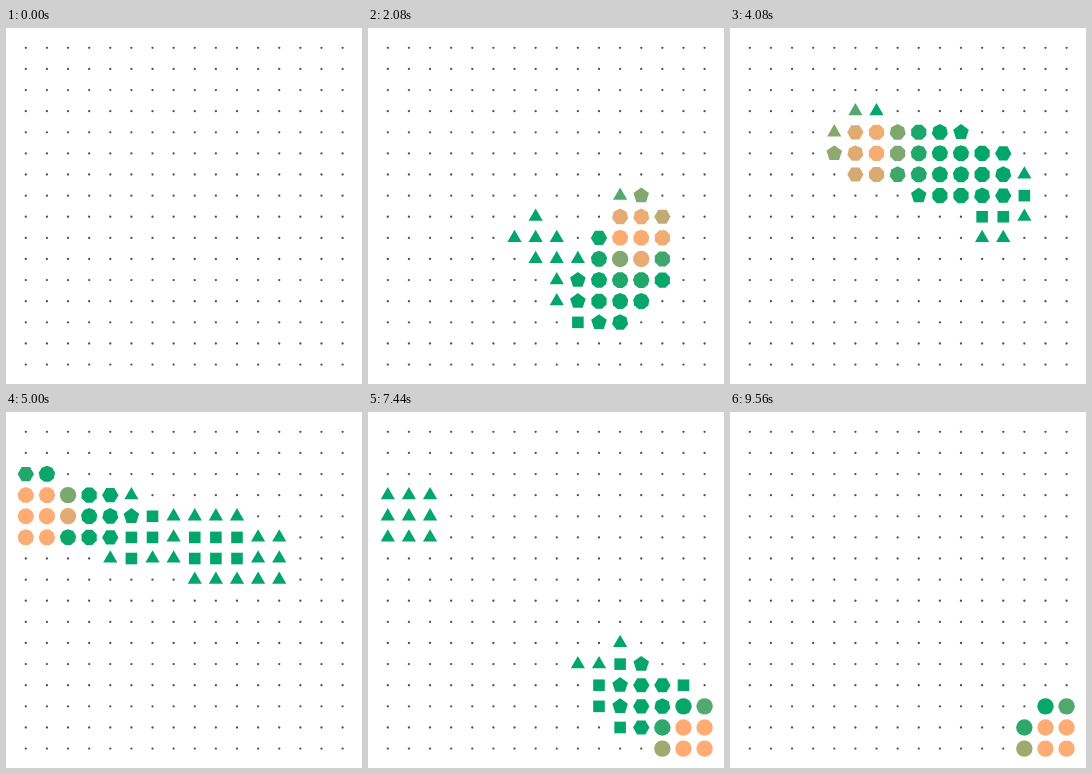
Animation of 356x356 px, one loop 9600 ms. Source, as an HTML page with a canvas:

```html
<!DOCTYPE html>
<html lang="en">
<head>
<meta charset="utf-8">
<title>Polygon trail</title>
<style>
  html, body { margin: 0; width: 100%; height: 100%; overflow: hidden; background: #fff; }
  canvas { display: block; width: 356px; height: 356px; }
</style>
</head>
<body>
<canvas id="stage"></canvas>
<script>
const SIZE = 356, LOOP = 9600, STEP = 40;
const COUNT = 16, START = 19.8, GAP = 21.12;
const REACH = 38, CORE = 33, RIM = 36.9;
const RISE = 0.17, FALL = 0.05, TINT = 0.5;
const RADIUS = 8.2, DOT = 1.15, MAX_SIDES = 11;
const GREEN = [3, 166, 106], ORANGE = [255, 172, 116];

// The pointer glides between these stops, easing in and out of each
const STOPS = [
  { at: 380, x: 140, y: 192 },
  { at: 920, x: 235, y: 272 },
  { at: 1700, x: 260, y: 257 },
  { at: 2250, x: 272, y: 180 },
  { at: 2800, x: 267, y: 157 },
  { at: 3160, x: 207, y: 127 },
  { at: 3500, x: 250, y: 150 },
  { at: 4400, x: 80, y: 104 },
  { at: 5000, x: 29, y: 97 },
  { at: 5750, x: 41, y: 107 },
  { at: 6400, x: 260, y: 276 },
  { at: 7250, x: 328, y: 329 }
];

const clamp = v => Math.max(0, Math.min(1, v));
const mix = (a, b, k) => a + (b - a) * k;
const smooth = k => k * k * (3 - 2 * k);

function pointerAt(time) {
  if (time < STOPS[0].at) return null;
  const next = STOPS.findIndex(stop => stop.at > time);
  if (next < 0) return STOPS[STOPS.length - 1];
  const a = STOPS[next - 1], b = STOPS[next];
  const k = smooth((time - a.at) / (b.at - a.at));
  return { x: mix(a.x, b.x, k), y: mix(a.y, b.y, k) };
}

function advance({ x, y, energy, heat }, pointer) {
  const distance = pointer ? Math.hypot(x - pointer.x, y - pointer.y) : Infinity;
  const inside = distance < REACH;
  return {
    x, y,
    energy: mix(energy, inside ? 1 : 0, inside ? RISE : FALL),
    heat: mix(heat, clamp((RIM - distance) / (RIM - CORE)), TINT)
  };
}

function simulate() {
  let cells = Array.from({ length: COUNT * COUNT }, (_, i) => ({
    x: START + (i % COUNT) * GAP,
    y: START + Math.floor(i / COUNT) * GAP,
    energy: 0,
    heat: 0
  }));
  const frames = [cells];
  for (let time = STEP; time < LOOP; time += STEP) {
    const pointer = pointerAt(time);
    cells = cells.map(cell => advance(cell, pointer));
    frames.push(cells);
  }
  return frames;
}

const canvas = document.getElementById("stage");
const ratio = window.devicePixelRatio || 1;
canvas.width = canvas.height = Math.round(SIZE * ratio);
const ctx = canvas.getContext("2d");
ctx.scale(ratio, ratio);

// Regular polygon resting on a flat base
function polygon(x, y, sides) {
  const first = Math.PI / 2 - Math.PI / sides;
  for (let i = 0; i < sides; i++) {
    const angle = first + i * 2 * Math.PI / sides;
    ctx.lineTo(x + RADIUS * Math.cos(angle), y + RADIUS * Math.sin(angle));
  }
  ctx.closePath();
}

function drawCell({ x, y, energy, heat }) {
  const sides = Math.floor(2 + 10 * energy);
  ctx.beginPath();
  if (sides < 3) {
    ctx.fillStyle = "#505050";
    ctx.arc(x, y, DOT, 0, 2 * Math.PI);
  } else {
    const rgb = GREEN.map((c, i) => Math.round(mix(c, ORANGE[i], heat)));
    ctx.fillStyle = `rgb(${rgb})`;
    if (sides < MAX_SIDES) polygon(x, y, sides);
    else ctx.arc(x, y, RADIUS, 0, 2 * Math.PI);
  }
  ctx.fill();
}

const frames = simulate();
const origin = performance.now();

function render() {
  const time = Math.max(0, performance.now() - origin) % LOOP;
  ctx.fillStyle = "#fff";
  ctx.fillRect(0, 0, SIZE, SIZE);
  frames[Math.floor(time / STEP)].forEach(drawCell);
  requestAnimationFrame(render);
}
render();
</script>
</body>
</html>
```
